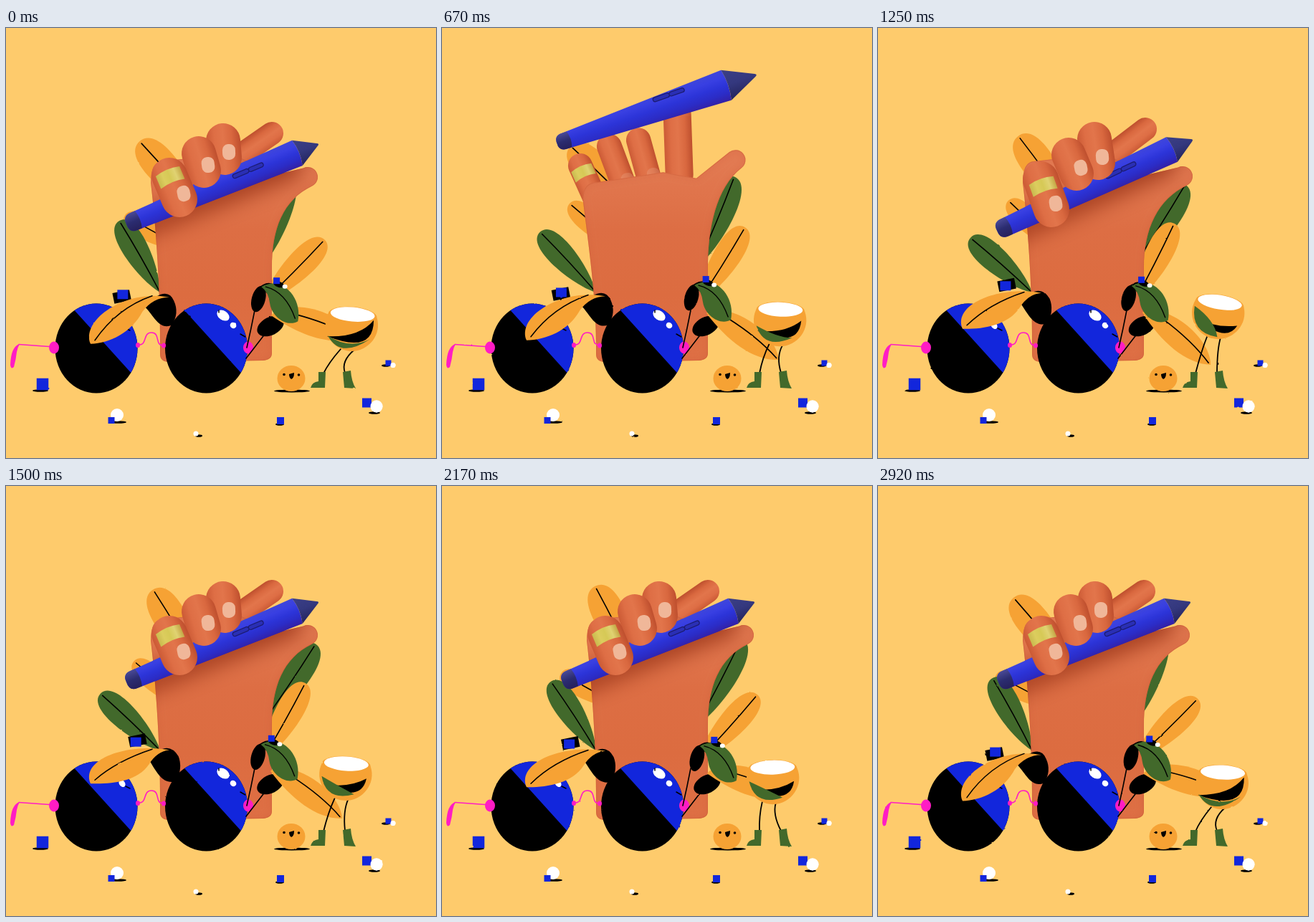
An HTML page with a canvas that plays this animation: 600 px wide and 600 px high, repeating every 3010 ms.

```html
<!DOCTYPE html>
<html lang="en">
<head>
<meta charset="utf-8">
<title>Pen trick</title>
<style>
  html, body { margin: 0; width: 100%; height: 100%; overflow: hidden; background: #fecb6c; }
  canvas { position: absolute; left: 0; top: 0; }
  .rough { filter: url(#rough); }
  svg { position: absolute; }
</style>
</head>
<body>
<svg width="0" height="0">
  <filter id="rough" x="0" y="0" width="1" height="1" color-interpolation-filters="sRGB">
    <feTurbulence type="fractalNoise" baseFrequency=".11" numOctaves="2"/>
    <feDisplacementMap in="SourceGraphic" scale="1.6" xChannelSelector="R" yChannelSelector="G"/>
  </filter>
</svg>
<canvas id="back" class="rough" width="600" height="600"></canvas>
<canvas id="hand" width="600" height="600"></canvas>
<canvas id="front" class="rough" width="600" height="600"></canvas>
<script>
const LOOP = 3010, STEP = LOOP / 36, TAU = Math.PI * 2;
const BLUE = '#1226dc', PINK = '#ff1cc4', ORANGE = '#f6a234', GREEN = '#42692b', BLACK = '#000', WHITE = '#fff';
const [back, hand, front] = ['back', 'hand', 'front'].map(id => document.getElementById(id).getContext('2d'));
const noise = document.querySelector('feTurbulence');

// --- timing helpers
function mix(a, b, u) {
  if (typeof a === 'number') return a + (b - a) * u;
  if (Array.isArray(a)) return a.map((v, i) => mix(v, b[i], u));
  return Object.fromEntries(Object.keys(a).map(k => [k, mix(a[k], b[k], u)]));
}
function at(keys, t) {
  const i = Math.max(1, keys.findIndex(k => k[0] > t));
  const [t0, a] = keys[i - 1], [t1, b] = keys[i];
  const u = (t - t0) / (t1 - t0);
  return mix(a, b, u * u * (3 - 2 * u));
}
const sway = (t, peak) => Math.cos((t - peak) / LOOP * TAU);

// --- drawing helpers
function fill(c, d, color) { c.fillStyle = color; c.fill(new Path2D(d)); }
function line(c, d, color, width) {
  c.strokeStyle = color; c.lineWidth = width; c.lineCap = 'round';
  c.stroke(new Path2D(d));
}
function oval(c, x, y, rx, ry, color, deg = 0) {
  c.beginPath(); c.ellipse(x, y, rx, ry, deg * TAU / 360, 0, TAU);
  c.fillStyle = color; c.fill();
}
function box(c, x, y, w, h, color) { c.fillStyle = color; c.fillRect(x - w / 2, y - h / 2, w, h); }
function placed(c, x, y, angle, draw) {
  c.save(); c.translate(x, y); c.rotate(angle); draw(); c.restore();
}
function ramp(c, x0, y0, x1, y1, ...colors) {
  const g = c.createLinearGradient(x0, y0, x1, y1);
  colors.forEach((col, i) => g.addColorStop(i / (colors.length - 1), col));
  return g;
}

// --- leaves behind the hand
function leaf(x, y, deg, len, w, color) {
  placed(back, x, y, deg * TAU / 360, () => {
    fill(back, `M0 0C${-w * .9} ${-len * .25} ${-w * 1.6} ${-len} 0 ${-len}C${w * 1.6} ${-len} ${w * .9} ${-len * .25} 0 0`, color);
    line(back, `M0 0Q2 ${-len / 2} 0 ${4 - len}`, BLACK, 1.6);
  });
}
function drawBack(t) {
  leaf(272, 256, -36 + 10 * sway(t, 2000), 130, 24, ORANGE);
  leaf(250, 310, -54 + 10 * sway(t, 1100), 97, 17, ORANGE);
  leaf(215, 369, -38 + 10.5 * sway(t, 2700), 115, 19, GREEN);
  leaf(355, 335, 25 + 9 * sway(t, 1550), 138, 22, GREEN);
  leaf(356, 385, 37 + 10 * sway(t, 2680), 126, 20, ORANGE);
}

// --- hand poses; a finger is [x1, y1, x2, y2, radius]
const relaxed = {
  pinky: [228, 206, 242, 239, 25], ring: [269, 175, 276, 199, 24],
  middle: [303, 157, 305, 181, 24], index: [335, 172, 371, 147, 16],
  side: [202, 216], knuckle: [218, 186], top: [315, 175], web: [375, 205], thumb: [421, 208, -.45],
  pen: [171, 273, 436, 162], girth: [13, 19, 32], button: [.635, -4],
  nail: -8, band: [3, 36, 19], open: 0
};
const rolled = {
  pinky: [223, 207, 234, 254, 23], ring: [265, 178, 278, 227, 22],
  middle: [305, 158, 311, 198, 24], index: [350, 161, 356, 174, 21],
  side: [201, 220], knuckle: [220, 195], top: [335, 190], web: [385, 200], thumb: [417, 194, -1.13],
  pen: [198, 316, 441, 148], girth: [13, 17, 31], button: [.635, 0],
  nail: 5, band: [15, 33, 24], open: 0
};
const balanced = {
  pinky: [183, 187, 208, 235, 15], ring: [223, 161, 245, 215, 16],
  middle: [264, 156, 282, 215, 15], index: [321, 107, 323, 215, 19],
  side: [195, 245], knuckle: [215, 222], top: [300, 205], web: [345, 213], thumb: [407, 181, -.5],
  pen: [152, 109, 438, 38], girth: [11, 24, 49], button: [.55, -18],
  nail: -8, band: [10, 30, 13], open: 1
};
const caught = {
  ...relaxed,
  pinky: [227, 211, 242, 253, 25], ring: [266, 177, 277, 203, 24],
  middle: [302, 155, 307, 188, 24], index: [335, 170, 373, 141, 16],
  thumb: [425, 207, -.45], pen: [169, 282, 439, 156], band: [11, 36, 18]
};
const trick = [[0, relaxed], [330, rolled], [500, rolled], [750, balanced], [1000, balanced],
  [1200, caught], [1250, caught], [1420, relaxed], [LOOP, relaxed]];

function finger([x1, y1, x2, y2, r]) {
  const len = Math.hypot(x2 - x1, y2 - y1), nx = (y2 - y1) / len * r, ny = (x1 - x2) / len * r;
  const skin = ramp(hand, x1 - nx, y1 - ny, x1 + nx, y1 + ny, '#cb5a35', '#de6e45', '#e2754b', '#d9683f', '#be4f2e');
  line(hand, `M${x1} ${y1}L${x2} ${y2}`, skin, r * 2);
}
function nail([x1, y1, x2, y2], dy) {
  placed(hand, x2 + 6, y2 + dy, Math.atan2(x1 - x2, y2 - y1) / 2, () => {
    hand.beginPath(); hand.roundRect(-9, -11, 18, 22, 8);
    hand.fillStyle = '#f0b799'; hand.fill();
  });
}
function goldBand([x1, y1, x2, y2], [off, w, h]) {
  const a = Math.atan2(y2 - y1, x2 - x1);
  placed(hand, x1 + off * Math.cos(a), y1 + off * Math.sin(a), a - TAU / 4, () => {
    const x = w / 2, y = h / 2;
    fill(hand, `M${-x} ${y}V${-y}Q0 ${-y - 5} ${x} ${-y}V${y}Q0 ${y - 5} ${-x} ${y}`,
      ramp(hand, -x, 0, x, 0, '#c9b94e', '#dccd5e', '#d6c956', '#e0d272', '#c4a645'));
  });
}
function palmPath(p) {
  const [lx, ly] = p.side, [kx, ky] = p.knuckle, [tx, ty, a] = p.thumb;
  const px = tx - 14 * Math.sin(a), py = ty + 14 * Math.cos(a);
  const palm = new Path2D(`M215 455C216 380 ${lx + 8} ${ly + 65} ${lx} ${ly}Q${lx} ${ky} ${kx} ${ky}L${p.top}L${p.web}`);
  palm.arc(tx, ty, 14, a - TAU / 4, a + TAU / 4);
  palm.bezierCurveTo(px - 45 * Math.cos(a), py - 45 * Math.sin(a), 371, 280, 371, 335);
  palm.lineTo(371, 454);
  palm.quadraticCurveTo(371, 463, 358, 464);
  palm.lineTo(228, 466);
  palm.quadraticCurveTo(215, 466, 215, 455);
  return palm;
}
function drawPen([x0, y0, x1, y1], [tail, w, cone], [pos, off]) {
  placed(hand, x0, y0, Math.atan2(y1 - y0, x1 - x0), () => {
    const len = Math.hypot(x1 - x0, y1 - y0), neck = len - cone;
    fill(hand, `M8 ${-tail}L${neck} ${-w}Q${neck + 5} 0 ${neck} ${w}L8 ${tail}Q-4 ${tail} -3 0Q-4 ${-tail} 8 ${-tail}`,
      ramp(hand, 0, -w, 0, w, '#3f46da', '#383fe2', '#2c34d8', '#2b2cc6', '#3420a4'));
    hand.shadowColor = 'transparent';
    fill(hand, `M8 ${-tail}L15 ${-tail}Q19 0 15 ${tail}L8 ${tail}Q-4 ${tail} -3 0Q-4 ${-tail} 8 ${-tail}`,
      ramp(hand, 0, -tail, 0, tail, '#4a4a96', '#2b2c70', '#26205c'));
    fill(hand, `M${neck} ${-w}L${len - 2} -2Q${len + 2} 0 ${len - 2} 2L${neck} ${w}Q${neck + 5} 0 ${neck} ${-w}`,
      ramp(hand, 0, -w, 0, w, '#3b3f86', '#34387e', '#24245c'));
    const bx = len * pos;
    hand.beginPath();
    hand.roundRect(bx - 23, off - 3, 24, 6, 3); hand.roundRect(bx + 1, off - 3, 22, 6, 3);
    hand.fillStyle = '#2a2fb4'; hand.fill();
    hand.strokeStyle = '#1c1c74'; hand.lineWidth = 1.3; hand.stroke();
  });
}
function drawHand(t) {
  const p = at(trick, t), palm = palmPath(p), rock = 3 * p.open * Math.sin((t - 920) / 80);
  const pen = [p.pen[0], p.pen[1] - rock, p.pen[2], p.pen[3] + rock];
  const drawFingers = () => {
    [p.middle, p.ring, p.pinky].forEach(finger);
    goldBand(p.pinky, p.band);
    hand.globalAlpha = 1 - p.open;
    [p.middle, p.ring, p.pinky].forEach(f => nail(f, p.nail));
    hand.globalAlpha = 1;
  };
  finger(p.index);
  hand.globalAlpha = (p.nail + 8) / 13 * (1 - p.open);
  oval(hand, p.index[0] + 11, p.index[1] - 3, 9, 5, '#f0b799', 25);
  hand.globalAlpha = 1;
  if (p.open > .5) drawFingers();

  hand.fillStyle = ramp(hand, 0, 190, 0, 463, '#e27951', '#dd6e44', '#dc6c40', '#de6f44');
  hand.fill(palm);
  hand.save();
  hand.clip(palm);
  // soft shading around the rim, then the shadow cast by the pen
  hand.shadowColor = '#b8482a'; hand.shadowBlur = 10;
  hand.strokeStyle = '#c9583466'; hand.lineWidth = 2;
  hand.stroke(palm);
  hand.shadowColor = '#a03a1c'; hand.shadowBlur = 30; hand.shadowOffsetY = 12;
  drawPen(pen, p.girth, p.button);
  hand.restore();
  drawPen(pen, p.girth, p.button);
  if (p.open <= .5) drawFingers();
}

// --- foreground
function lens(x) {
  front.save();
  front.beginPath(); front.ellipse(x, 447, 57.5, 62.5, 0, 0, TAU); front.clip();
  box(front, x, 447, 130, 130, BLACK);
  fill(front, `M${x - 39.5} 384L${x + 51} 484H${x + 80}V370H${x - 39.5}`, BLUE);
  front.restore();
}
function drawGlasses() {
  lens(126); lens(279.5);
  oval(front, 162, 415, 4, 5.5, WHITE, -35);
  oval(front, 303, 401, 9.5, 6.5, WHITE, 35);
  oval(front, 317, 415, 4.5, 4, WHITE, 35);
  line(front, 'M167 419L173 422M327 427L334 431M297 394V397', BLACK, 1.5);
  line(front, 'M67 445L18 441.5', PINK, 1.5);
  fill(front, 'M19 441Q7 444 6 470Q7 477 11 473Q14 462 15 452Q16 446 19 441', PINK);
  line(front, 'M184 442C198 444 190 425 203 425C216 425 207 444 220 443', PINK, 1.6);
  oval(front, 184, 442.5, 3, 3.5, PINK); oval(front, 220, 443, 3, 3.5, PINK);
  oval(front, 67, 446, 7, 8.5, PINK); oval(front, 338, 446, 7, 8.5, PINK);
}
function drawCurledLeaf(t) {
  const c = sway(t, 200), q = (1 - c) / 2, tip = 442 - 28 * q;
  const cx = 172 - 10 * c, cy = 364.5 + 8 * c;
  placed(front, cx, cy, -.2, () => box(front, -2 + 5 * q, 3 - 5 * q, 24, 15, BLACK));
  box(front, cx, cy, 15, 13, BLUE);
  fill(front, `M${192 + 8 * q} ${388 - 6 * q}Q225 ${358 - 6 * q} ${234 + 7 * q} ${381 - 4 * q}Q${242 + 5 * q} ${398 - 5 * q} ${231 + 7 * q} ${415 - 3 * q}C${212 + 7 * q} ${422 - 5 * q} ${206 + 5 * q} 400 ${192 + 8 * q} ${388 - 6 * q}`, BLACK);
  fill(front, `M118 ${tip}C104 ${tip - 34} 168 ${364 - 6 * q} 228 ${376 - 8 * q}Q${205 + 6 * q} ${376 - 6 * q} ${190 + 10 * q} ${396 - 8 * q}C${175 + 8 * q} ${425 - 12 * q} 145 ${441 - 26 * q} 118 ${tip}`, ORANGE);
  line(front, `M124 ${tip - 5}Q155 ${391 - 8 * q} 204 ${374 - 7 * q}`, BLACK, 1.5);
}
function drawSprigs(t) {
  const s = sway(t, 2300);
  line(front, 'M347 394Q342 420 336 446M362 426L335 461', BLACK, 1.6);
  oval(front, 369 + s, 416, 20, 12.5, BLACK, -27);
  placed(front, 380, 396, (28 + 14 * sway(t, 1100)) * TAU / 360, () => {
    fill(front, 'M-8 8C6 -24 85 -30 112 0C85 22 40 22 -8 8', ORANGE);
    line(front, 'M20 -4Q70 -8 108 0', BLACK, 1.6);
  });
  front.save();
  front.translate(4 * s, 2 * s);
  oval(front, 352, 378, 9.5, 18.5, BLACK, 15);
  fill(front, 'M350 364Q364 350 376 359L370 376Q358 362 350 364', BLACK);
  fill(front, 'M356 361C384 344 414 376 407 409C392 418 371 403 368 385Q366 368 356 361', GREEN);
  line(front, 'M362 361Q390 368 403 405', BLACK, 1.4);
  front.restore();
  const x = 374 + 7.5 * sway(t, 2500), y = 352.5 + 2 * s;
  oval(front, x + 3, y + 5, 8, 4, BLACK, 20);
  box(front, x, y, 9, 9, BLUE);
  oval(front, x + 11.5, y + 8, 3.5, 3, WHITE);
}

// Dancing cup: [x, y, tilt, turn]
const dance = [[0, [482, 419, 5, 0]], [330, [466, 403, 8, 1]], [920, [475, 418, -1, 0]], [1250, [474, 402, 9, 1]],
  [1830, [473, 414, -4, 0]], [2420, [455, 411, 0, 1]], [2920, [480, 419, 3, 0]], [LOOP, [482, 419, 5, 0]]];
const bandFront = [[-32, 13, -12, 44, 27, 13, 0, 30], [-34, -9, -34, 29, 4, 29, -3, 6]];
const bandBack = [[-33, 14, 12, 12, 30, -14, 34, 34], [-28, 8, 0, 17, 29, 9, 17, 36]];
function crescent([ax, ay, bx, by, cx, cy, dx, dy], color) {
  fill(front, `M${ax} ${ay}Q${bx} ${by} ${cx} ${cy}Q${dx} ${dy} ${ax} ${ay}`, color);
}
function drawDancer(t) {
  const [x, y, tilt, turn] = at(dance, t), bend = (y - 400) * .6;
  line(front, `M${x - 15} ${y + 29}Q${(x + 430) / 2 - bend / 2} ${y + 48} 443 482M${x + 4} ${y + 30}Q${(x + 475) / 2 - bend} ${y + 46} 473 481`, BLACK, 1.8);
  fill(front, 'M436 480L446 480L445 502H425Q427 494 436 493Z', GREEN);
  fill(front, 'M470 480L481 478Q482 493 488 503L472 502Z', GREEN);
  placed(front, x, y, tilt * TAU / 360, () => {
    oval(front, 0, -18, 34, 12, ORANGE);
    fill(front, 'M-34 -18C-44 6 -25 32 0 32C25 32 44 6 34 -18Z', ORANGE);
    crescent(mix(...bandBack, turn), BLACK);
    crescent(mix(...bandFront, turn), GREEN);
    oval(front, 0, -19.5, 31, 10, WHITE);
  });
}
function drawPebbles() {
  oval(front, 399, 506.5, 25, 2, BLACK);
  oval(front, 398, 489, 19.5, 18, ORANGE);
  oval(front, 388, 483.5, 1.8, 1.8, BLACK); oval(front, 408.5, 484, 1.8, 1.8, BLACK);
  fill(front, 'M395 483L402 481Q402 489 398 490Q395 488 395 483', BLACK);
  // [shadow x, y, rx, cube x, y, size, ball x, y, r]
  [[48, 506, 11, 51, 497, 16.5, 0, 0, 0], [157, 550, 11, 147, 547.5, 9, 155, 540, 9],
   [269, 569, 5, 0, 0, 0, 265, 566, 3.5], [382, 553, 6, 383, 548, 10, 0, 0, 0],
   [530, 471, 6, 533.5, 467.5, 8, 540, 470.5, 3.5], [514, 537, 8, 503.5, 523, 13, 517, 528, 8.5]
  ].forEach(([sx, sy, sr, cx, cy, size, bx, by, r]) => {
    oval(front, sx, sy, sr, 1.8, BLACK);
    oval(front, bx, by, r, r, WHITE);
    box(front, cx, cy, size, size, BLUE);
    if (cx > 500) oval(front, bx, by, r, r, WHITE);
  });
}

const start = performance.now();
function draw() {
  const step = Math.floor((performance.now() - start + 12) / STEP) % 36, t = step * STEP;
  [back, hand, front].forEach(c => c.clearRect(0, 0, 600, 600));
  noise.setAttribute('seed', step + 1);
  drawBack(t);
  drawHand(t);
  drawGlasses();
  drawCurledLeaf(t);
  drawSprigs(t);
  drawDancer(t);
  drawPebbles();
  requestAnimationFrame(draw);
}
draw();
</script>
</body>
</html>
```
